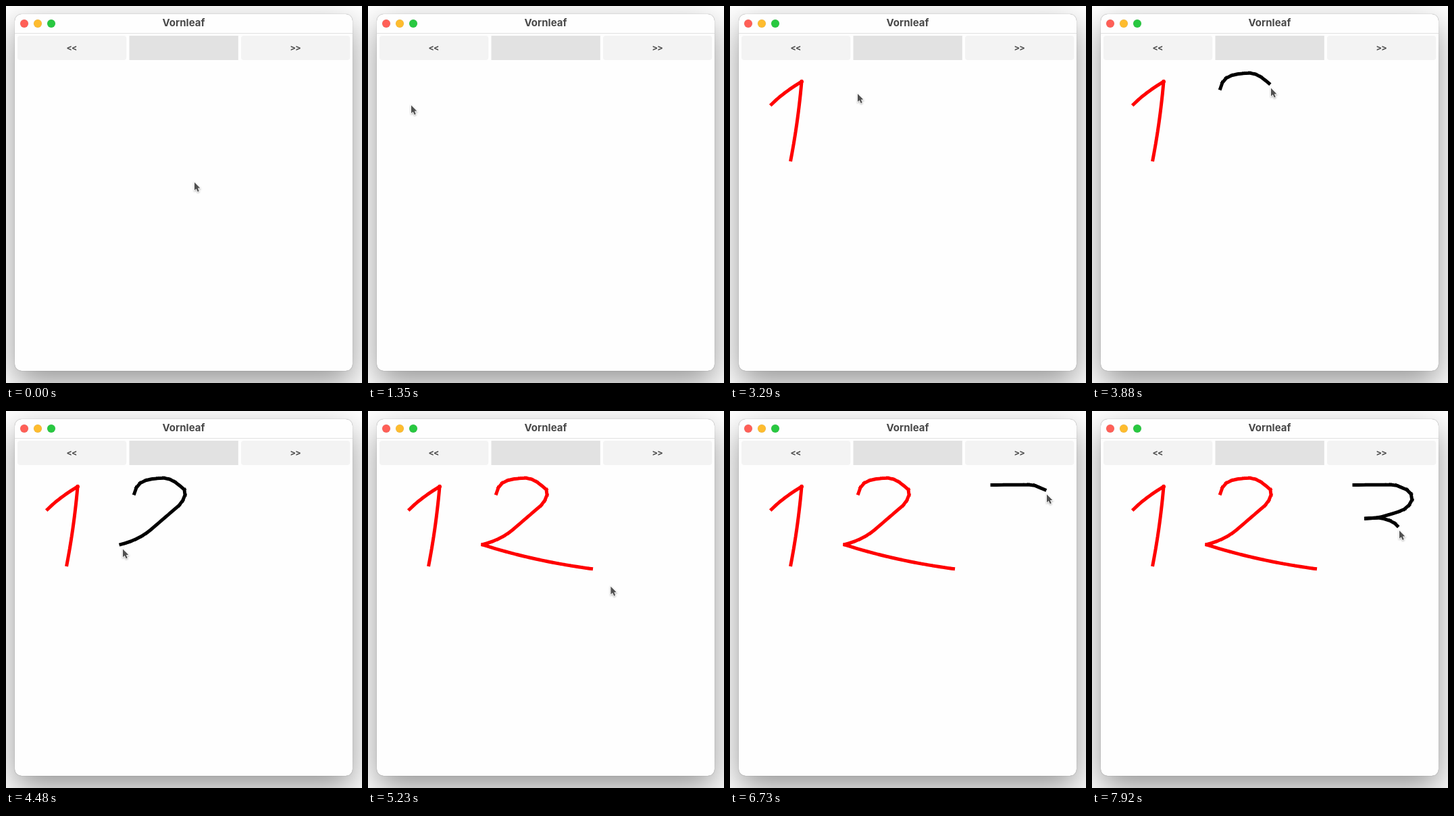
Recreate the animation shown at these times as an HTML page. Size 527 by 558 pixels, loop 8000 ms.

```html
<!DOCTYPE html>
<html lang="en">
<head>
<meta charset="utf-8">
<title>Vornleaf</title>
<style>
  html, body { margin: 0; width: 100%; height: 100%; overflow: hidden; background: #fff; }
  .window {
    position: absolute; left: 13px; top: 12px; width: 500px; height: 528px;
    border-radius: 10px; background: #fefefe;
    box-shadow: 0 0 1px rgba(0,0,0,.55), 0 18px 48px rgba(0,0,0,.42);
  }
  svg { position: absolute; left: 0; top: 0; width: 527px; height: 558px; }
  text { text-anchor: middle; fill: #484848; }
  circle { stroke: rgba(0,0,0,.12); stroke-width: .5; }
  .title { font: 700 15px Inter, sans-serif; }
  .label { font: 500 15px Roboto, sans-serif; }
  #ink { fill: none; stroke-width: 5; stroke-linecap: square; }
</style>
</head>
<body>
<div class="window"></div>
<svg viewBox="0 0 527 558">
  <circle cx="27" cy="26" r="6" fill="#ff5f57"/>
  <circle cx="47" cy="26" r="6" fill="#febc2e"/>
  <circle cx="67" cy="26" r="6" fill="#28c840"/>
  <text class="title" x="263" y="30">Vornleaf</text>
  <path d="M13 40.5H513" stroke="#e1e1e1"/>
  <rect x="17" y="44" width="161.3" height="36" rx="4" fill="#f3f3f3"/>
  <rect x="182.5" y="44" width="161.3" height="36" fill="#e2e2e2"/>
  <rect x="348" y="44" width="161.3" height="36" rx="4" fill="#f3f3f3"/>
  <text class="label" x="97.5" y="67">&lt;&lt;</text>
  <text class="label" x="428.5" y="67">&gt;&gt;</text>
  <g id="ink"></g>
  <path id="cursor" d="M0 0V11.8L2.7 9.4L4.8 14L6.8 13.1L4.9 8.6H8.4Z" fill="#505050"
        stroke="#fff" stroke-width="1.6" paint-order="stroke"
        style="filter: drop-shadow(0 1px 1px rgba(0,0,0,.3))"/>
</svg>
<script>
const LOOP = 8000, TICK = 150, SEGMENT = 9;
const ink = document.getElementById('ink');
const cursor = document.getElementById('cursor');
const phases = [];

function addPhase(from, to, d, isPen) {
  const path = document.createElementNS('http://www.w3.org/2000/svg', 'path');
  path.setAttribute('d', d);
  const length = path.getTotalLength();
  const at = distance => {
    const { x, y } = path.getPointAtLength(distance);
    return [x, y];
  };
  const line = isPen && ink.appendChild(path);
  phases.push({ from, to, length, at, line });
}
const travel = (from, to, d) => addPhase(from, to, d, false);
const draw = (from, to, d) => addPhase(from, to, d, true);

travel(0, 900, 'M279 261Q130 70 58 148');
travel(1200, 1350, 'M58 148L64 147');
draw(1350, 1800, 'M61.5 145.5Q79 128 106 112');
draw(1800, 2250, 'M106 112Q101 170 90 227.5');
travel(2550, 3290, 'M93 234C150 220 280 140 189 130');
draw(3430, 4480, 'M190 122C194 106 201 100 238 99L252 106L266 118Q265 130 257 139L214 176Q196 191 170 197.5');
draw(4480, 4780, 'M170 198Q245 222 330.5 233.5');
travel(5080, 5830, 'M333 238C450 360 555 110 383 120');
travel(5830, 6130, 'M383 120L384 115');
draw(6280, 6730, 'M388 109.5L448 109L466 116.5');
draw(6730, 7470, 'M466 116.5C478 125 477 136 460 147Q442 153 424 158L405.5 159');
draw(7470, 7920, 'M405.5 159L424 158Q445 161 452 170');

// Eased progress, held for one tick at a time.
function progress({ from, to }, now) {
  const ticks = Math.round((to - from) / TICK);
  const t = Math.floor(ticks * (now - from) / (to - from) + 1e-6) / ticks;
  const p = Math.min(1, Math.max(0, t));
  return p * p * (3 - 2 * p);
}

// Short separate segments give the rough, square-capped pen line.
function segments(at, end) {
  let d = '';
  for (let s = 0; s < end; s += SEGMENT) {
    d += `M${at(s)}L${at(Math.min(s + SEGMENT, end))}`;
  }
  return d;
}

// Sample geometry from copies, because the visible paths are rewritten.
for (const phase of phases.filter(p => p.line)) {
  const guide = phase.line.cloneNode();
  phase.at = distance => {
    const { x, y } = guide.getPointAtLength(distance);
    return [x, y];
  };
}

function render() {
  const now = performance.now() % LOOP;
  const shown = phases.map(phase => phase.length * progress(phase, now));
  const current = Math.max(0, shown.findLastIndex(s => s > 0));
  const lastTravel = phases.findLastIndex((p, i) => !p.line && i <= current);

  phases.forEach(({ line, at }, i) => {
    if (!line) return;
    line.setAttribute('d', segments(at, shown[i]));
    line.setAttribute('stroke', i < lastTravel ? '#f00' : '#000');
  });

  const { at, line } = phases[current];
  const [x, y] = at(shown[current]);
  cursor.setAttribute('transform', line ? `translate(${x + 3} ${y + 7})` : `translate(${x} ${y})`);
  requestAnimationFrame(render);
}
render();
</script>
</body>
</html>
```
